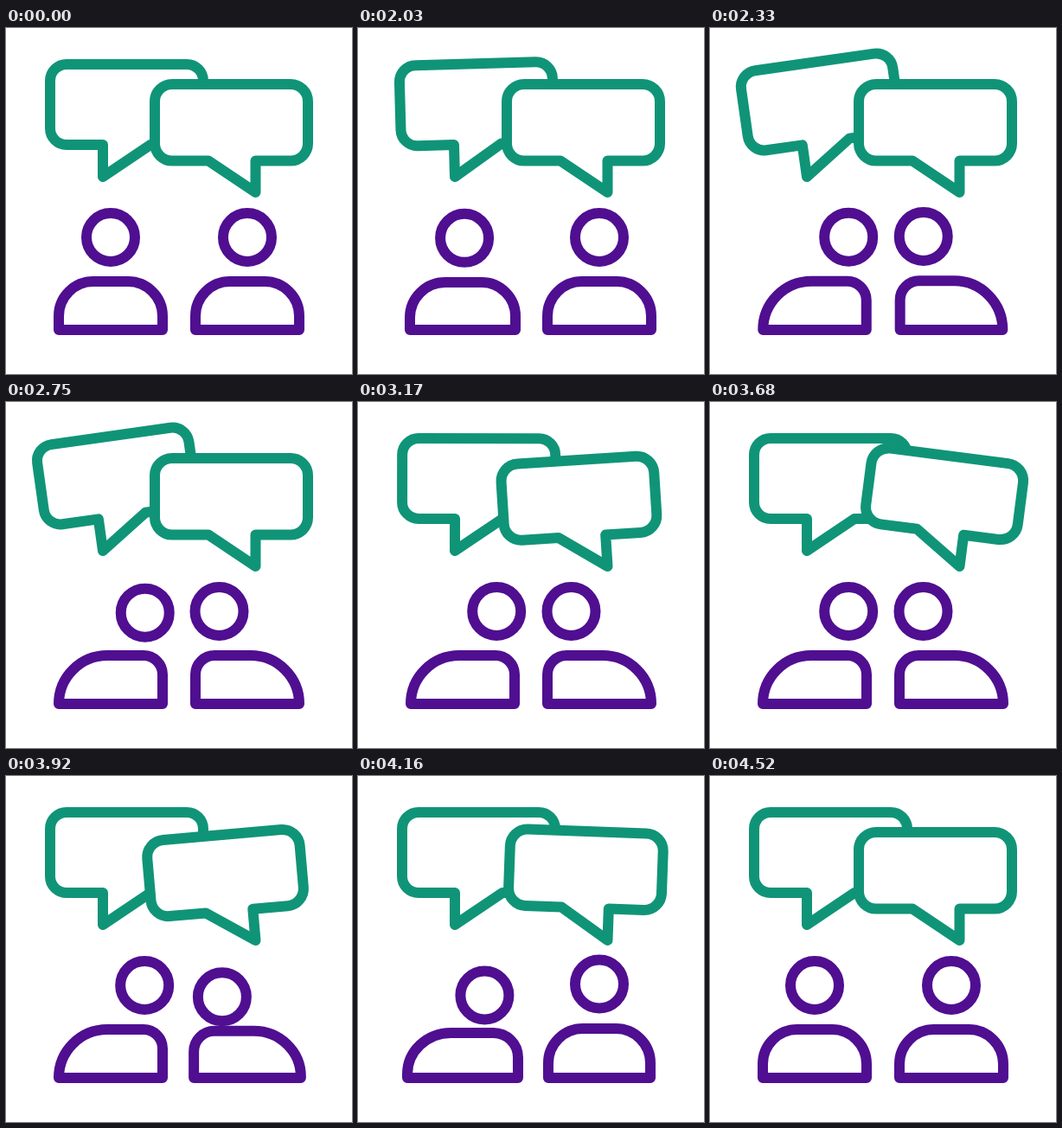
Write an HTML page that moves like this. It is 400 px wide and 400 px high and loops after 4550 ms.

```html
<!DOCTYPE html>
<html lang="en">
<head>
<meta charset="utf-8">
<title>Conversation</title>
<style>
  html, body { margin: 0; width: 100%; height: 100%; overflow: hidden; background: #fff; }
  svg { display: block; width: 100vw; height: 100vh; }
  svg * { fill: #fff; stroke-width: 12; stroke-linejoin: round; }
  .bubble { stroke: #109477; }
  .person * { fill: none; stroke: #500e91; }
</style>
</head>
<body>
<svg viewBox="0 0 400 400">
  <path id="bubbleA" class="bubble" d="M70 42H209a19 19 0 0 1 19 19V116a19 19 0 0 1-19 19H167L112 172V135H70a19 19 0 0 1-19-19V61a19 19 0 0 1 19-19Z"/>
  <path id="bubbleB" class="bubble" d="M192 65H329a20 20 0 0 1 20 20V133.500a20 20 0 0 1-20 20H288.500V190L234 153.500H192a20 20 0 0 1-20-20V85a20 20 0 0 1 20-20Z"/>
  <g id="personA" class="person"><circle r="28"/><path/></g>
  <g id="personB" class="person" transform="translate(400) scale(-1 1)"><circle r="28"/><path/></g>
</svg>
<script>
const LOOP = 4550, HOLD = 2000, STEP = 30;
const $ = id => document.getElementById(id);
const clamp = v => Math.min(1, Math.max(0, v));
const ease = v => { v = clamp(v); return v * v * (3 - 2 * v); };
const bump = v => Math.sin(Math.PI * v) ** 2;
const mix = (a, b, k) => a + (b - a) * k;

// Eased interpolation through [time, value] pairs
function track(keys, f) {
  let value = keys[0][1];
  for (let i = 1; i < keys.length; i++) {
    const [t0, v0] = keys[i - 1], [t1, v1] = keys[i];
    if (f > t0) value = mix(v0, v1, ease((f - t0) / (t1 - t0)));
  }
  return value;
}

const SWING = [[-.4, 0], [7.8, -20.5], [15.8, 14.8], [23.8, -8.7], [31.8, 3], [39.8, 0]];
const NOD = [[23, 0], [31, 1], [39, 0], [47, 1], [55, 0]];

function drawBubble(id, f, x, y) {
  $(id).setAttribute("transform", `rotate(${track(SWING, f)} ${x} ${y})`);
}

// A person turns at `start` and turns back at `end`, squashing on the way
function drawPerson(id, f, start, end, turnedX, nod) {
  const out = clamp((f - start) / 12), back = clamp((f - end) / 12);
  const u = back || out, turn = ease(out * 1.2) - ease(back * 1.2);
  const settle = u < .7 ? 0 : bump((u - .7) / .3);
  const press = u < .7 ? u / .7 : 0;
  const squash = 4 * bump(press) - settle;
  const dip = 14 * bump(press ** (back ? .6 : 1.42)) - 1.5 * settle;

  const [head, body] = $(id).children;
  head.setAttribute("cx", mix(121, turnedX, turn) + 3.5 * nod);
  head.setAttribute("cy", 242 + dip + 10.5 * nod);

  const left = 61 - squash, right = 181 + squash, top = 293 + squash;
  const r1 = mix(40, 56, turn), r2 = mix(40, 22, turn);
  const h1 = r1 - squash * turn;
  body.setAttribute("d", `M${left} 349V${top + h1}A${r1} ${h1} 0 0 1 ${left + r1} ${top}` +
    `H${right - r2}A${r2} ${r2} 0 0 1 ${right} ${top + r2}V349Z`);
}

function draw(now) {
  const f = Math.floor((now % LOOP - HOLD) / STEP) || -1;
  drawBubble("bubbleA", f, 112, 172);
  drawBubble("bubbleB", f - 37.2, 289, 190);
  drawPerson("personA", f, -.4, 68, 160.2, track(NOD, f));
  drawPerson("personB", f, 1.5, 62, 153.5, 0);
}

const begin = performance.now();
function loop() {
  draw(performance.now() - begin);
  requestAnimationFrame(loop);
}
loop();
</script>
</body>
</html>
```
